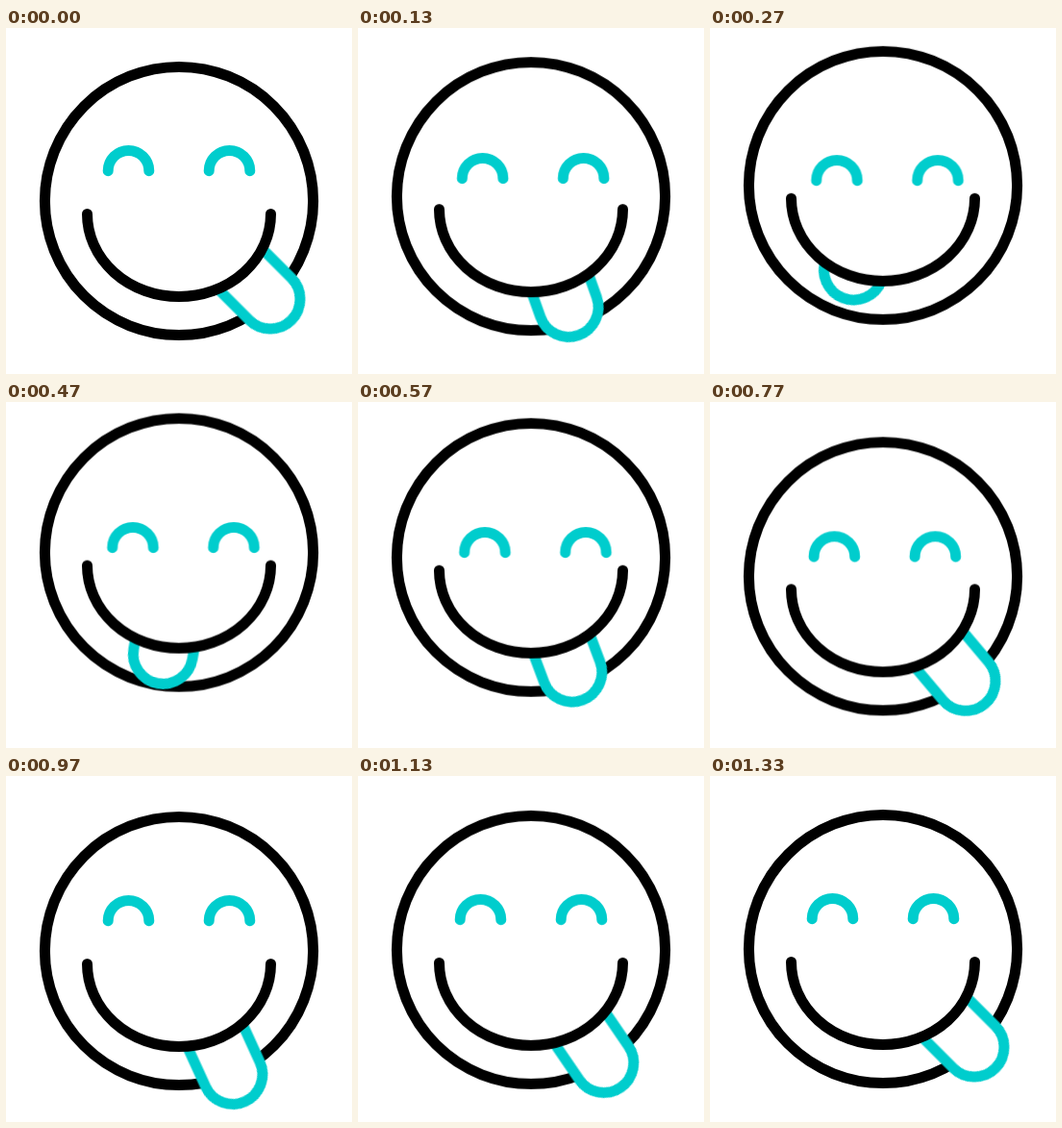
An HTML page that plays this animation: 360 px wide and 360 px high, repeating every 1.67 s.

```html
<!DOCTYPE html>
<html lang="en">
<head>
<meta charset="utf-8">
<title>Licking smiley</title>
<style>
  html, body { margin: 0; width: 100%; height: 100%; overflow: hidden; background: #fff; }
  svg { display: block; width: 100vw; height: 100vh; }

  .line { fill: none; stroke: #000; stroke-width: 11; stroke-linecap: round; }
  .teal { stroke: #00cdcd; }
  .white { fill: #fff; }

  /* 50 ticks per loop, so one tick is 2% */
  .bob, .eyes, .swing, .reach {
    animation: 1670ms cubic-bezier(.37, 0, .63, 1) infinite;
  }
  .bob { animation-name: bob; }
  .eyes { animation-name: eyes; }
  .swing { animation-name: swing; }
  .reach { animation-name: reach; }

  @keyframes bob {
    0%, 80%, 100% { transform: translateY(0); }
    26%, 28% { transform: translateY(-23.4px); }
    49% { transform: translateY(2.5px); }
  }
  @keyframes eyes {
    0%, 56%, 100% { transform: translate(0, 0); }
    16%, 34% { transform: translate(4.5px, 26.3px); }
  }
  @keyframes swing {
    0%, 78%, 100% { transform: rotate(-45deg); }
    19%, 22% { transform: rotate(25deg); }
    42% { transform: rotate(-43deg); }
    58% { transform: rotate(-24.5deg); }
  }
  @keyframes reach {
    0%, 80%, 100% { transform: translateY(133px); }
    18%, 20% { transform: translateY(85px); }
    42% { transform: translateY(132px); }
  }
</style>
</head>
<body>
<svg viewBox="0 0 360 360">
  <g transform="translate(180 180)">
    <g class="bob">
      <circle class="line" r="139.6"/>
      <g transform="translate(1 8)">
        <g class="swing">
          <g class="reach">
            <path class="line teal white" d="M-31-60V0A31 31 0 0 0 31 0V-60"/>
          </g>
        </g>
      </g>
      <path class="line white" d="M-95.5 13.5A95.5 86 0 0 0 95.5 13.5"/>
      <g class="eyes">
        <path class="line teal" d="M-73.8-31.3a21.3 21.3 0 0 1 42.6 0M31.2-31.3a21.3 21.3 0 0 1 42.6 0"/>
      </g>
    </g>
  </g>
</svg>
</body>
</html>
```
